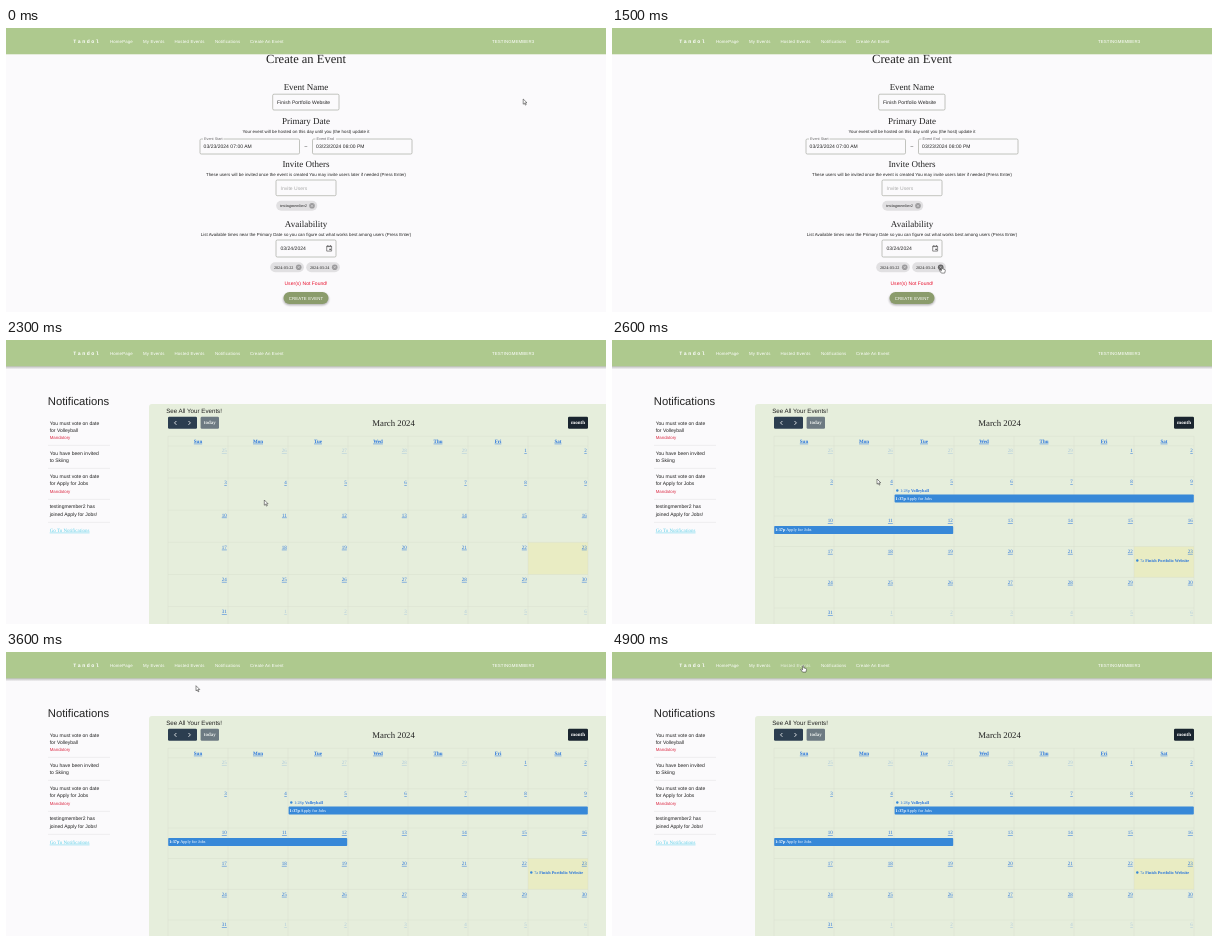
Write an HTML page that moves like this. It is 600x284 px and loops after 5 s.

```html
<!DOCTYPE html>
<html lang="en">
<head>
<meta charset="utf-8">
<title>Event planner</title>
<style>
  html, body { margin: 0; width: 100%; height: 100%; overflow: hidden; background: #fbfafc; }
  svg { display: block; width: 100%; height: 100%; }
  text { font-family: "Liberation Sans", Arial, sans-serif; text-rendering: geometricPrecision; white-space: pre; }
  .serif { font-family: "Liberation Serif", Times, serif; }
  .mono { font-family: "Liberation Mono", Courier, monospace; }
  .bold { font-weight: bold; }
  .link { text-decoration: underline; text-decoration-thickness: .3px; }
  .mid { text-anchor: middle; }
  .end { text-anchor: end; }
  .nav { letter-spacing: .125px; }
  .body { letter-spacing: .03px; }
</style>
</head>
<body>
<svg id="stage" viewBox="0 0 600 284"></svg>
<script>
const INK = '#222', LINK = '#2472dc', EVENT = '#3788d8', GRID = '#d3dbc9';
const $ = id => document.getElementById(id);

const text = (x, y, str, size, cls = '', fill = INK, extra = '') =>
  `<text x="${x}" y="${y}" font-size="${size}" class="${cls}" fill="${fill}" ${extra}>${str}</text>`;
const rect = (x, y, w, h, fill, r = 0, extra = '') =>
  `<rect x="${x}" y="${y}" width="${w}" height="${h}" rx="${r}" fill="${fill}" ${extra}/>`;
const path = (d, stroke, width = .5, fill = 'none') =>
  `<path d="${d}" stroke="${stroke}" stroke-width="${width}" fill="${fill}"/>`;
const field = (x, y, w, h) => rect(x, y, w, h, 'none', 1.25, 'stroke="#92958a" stroke-width=".55"');

function navBar() {
  const items = [[104, 'HomePage'], [137, 'My Events'], [168.5, 'Hosted Events', 'hosted'],
    [209, 'Notifications'], [244, 'Create An Event'], [486, 'TESTINGMEMBER3']];
  return `<g id="navShadow">${rect(0, 26, 600, 3.5, 'url(#shade)')}</g>` + rect(0, 0, 600, 26.3, '#aec98e') +
    text(67.3, 14.6, 'Tandol', 5, 'mono bold', '#fff', 'letter-spacing="1.5"') +
    items.map(([x, str, id = '']) => text(x, 14.5, str, 4.375, 'nav', '#fff', `id="${id}"`)).join('');
}

function chip(x, y, w, label, id = '') {
  const cx = x + w - 5.2, cy = y + 5;
  return rect(x, y, w, 10, '#e1e0e2', 5) + text(x + 3.7, y + 6.3, label, 4.2, 'serif') +
    `<circle id="${id}" cx="${cx}" cy="${cy}" r="2.8" fill="#9c9b9d"/>` +
    path(`M${cx - 1.1} ${cy - 1.1}l2.2 2.2m0-2.2l-2.2 2.2`, '#e6e5e7', .55);
}

function dateField(x, label, value) {
  return field(x, 111, 99.5, 15) + rect(x + 3, 110, 20.5, 2, '#fbfafc') +
    text(x + 4, 112.2, label, 3.75, '', '#666') + text(x + 3.6, 120.1, value, 5, 'body');
}

function formPage() {
  const heading = (y, str, size = 9) => text(300, y, str, size, 'serif mid');
  const note = (y, str) => text(300, y, str, 4.375, 'mid', INK, 'letter-spacing=".02"');
  return heading(35.2, 'Create an Event', 12.5) +
    heading(61.8, 'Event Name') + field(266.7, 66.2, 66.3, 15.8) +
    text(271, 75.8, 'Finish Portfolio Website', 5, 'body') +
    heading(95.8, 'Primary Date') +
    note(105.4, 'Your event will be hosted on this day until you (the host) update it') +
    dateField(194, 'Event Start', '03/23/2024 07:00 AM') + text(300, 120.3, '–', 5, 'mid') +
    dateField(306.5, 'Event End', '03/23/2024 08:00 PM') +
    heading(138.9, 'Invite Others') +
    note(148.4, 'These users will be invited once the event is created You may invite users later if needed (Press Enter)') +
    field(270, 152, 60, 15.7) + text(274.5, 161.5, 'Invite Users', 5, 'body', '#aaa') +
    chip(270.2, 172.8, 41, 'testingmember2') +
    heading(198.8, 'Availability') +
    note(208.3, 'List Available times near the Primary Date so you can figure out what works best among users (Press Enter)') +
    field(270, 212, 60, 17) + text(274.5, 222, '03/24/2024', 5, 'body') +
    path('M320.7 218.2h4.9v4.9h-4.9zM320.7 218.6h4.9M321.8 217v1M324.5 217v1', '#444', .6) +
    rect(323.4, 220.7, 1.4, 1.4, '#444') +
    chip(264.2, 234.2, 33.7, '2024-03-22') + chip(300.2, 234.2, 33.7, '2024-03-24', 'removeDate') +
    text(300, 256.9, 'User(s) Not Found!', 5, 'mid body', '#e8112d') +
    `<g id="buttonShadow">${rect(277.3, 265.3, 45.4, 12, '#000', 6, 'filter="url(#blur)"')}</g>` +
    rect(277.5, 264, 45, 12, '#8b9c6c', 6, 'id="button"') +
    text(300, 271.6, 'CREATE EVENT', 4.375, 'mid nav', '#fff');
}

function notifications() {
  const line = (y, str) => text(43.7, y, str, 5);
  const mandatory = y => text(43.7, y, 'Mandatory', 4.375, '', '#dc2b45');
  return text(41.8, 64.6, 'Notifications', 11.25) +
    line(84.7, 'You must vote on date') + line(91.9, 'for Volleyball') + mandatory(99.1) +
    line(114.9, 'You have been invited') + line(122.1, 'to Skiing') +
    line(138.1, 'You must vote on date') + line(145.3, 'for Apply for Jobs') + mandatory(152.5) +
    line(168.4, 'testingmember2 has') + line(175.6, 'joined Apply for Jobs!') +
    [105.4, 128.4, 159.4, 182.4].map(y => path(`M42 ${y}h62`, '#dcdbdd', .4)).join('') +
    text(43.7, 191.7, 'Go To Notifications', 5, 'serif link', '#5bcfe8');
}

// rowTops: upper edge of each of the six weeks
function calendarGrid(rowTops) {
  let out = rect(522, rowTops[3], 60, rowTops[4] - rowTops[3], '#e9ecc3');
  out += path(`M162 96.3h420M162 96.3v188` + rowTops.map(y => `M162 ${y}h420`).join('') +
    [1, 2, 3, 4, 5, 6, 7].map(c => `M${162 + c * 60} 96.3v188`).join(''), GRID, .4);
  ['Sun', 'Mon', 'Tue', 'Wed', 'Thu', 'Fri', 'Sat'].forEach((day, c) =>
    out += text(192 + c * 60, 102.7, day, 5, 'serif bold link mid', LINK));
  rowTops.forEach((top, row) => {
    for (let c = 0; c < 7; c++) {
      const date = new Date(2024, 1, 25 + row * 7 + c);
      const opacity = date.getMonth() === 2 ? 1 : .3;
      out += text(220.8 + c * 60, top + 6.4, date.getDate(), 5, 'serif link end', LINK, `opacity="${opacity}"`);
    }
  });
  return out;
}

function calendarEvents() {
  const dot = (x, y, time, title) => `<circle cx="${x}" cy="${y}" r="1.2" fill="${EVENT}"/>` +
    text(x + 2.9, y + 1.4, `${time} <tspan class="bold">${title}</tspan>`, 4.25, 'serif', LINK);
  const bar = (x, y, w) => rect(x, y, w, 8, EVENT, .8) +
    text(x + 1, y + 5.4, '<tspan class="bold">1:37p</tspan> Apply for Jobs', 4.25, 'serif', '#fff');
  return dot(285.3, 150.5, '1:28p', 'Volleyball') + bar(282.6, 154.6, 299.2) +
    bar(162.2, 186, 179) + dot(525.3, 220.5, '7a', 'Finish Portfolio Website');
}

function calendarPage() {
  return notifications() + rect(143, 64, 470, 240, '#e6eedc', 3) +
    text(160.2, 73.4, 'See All Your Events!', 6.2) +
    rect(162, 76.8, 29, 12, '#2c3e50', 1.25) +
    path('M170.4 81l-1.9 1.9l1.9 1.9M182.5 81l1.9 1.9l-1.9 1.9', '#fff', .8) +
    rect(194.6, 76.8, 18.4, 12, '#6d7a82', 1.25) + text(203.8, 84.3, 'today', 5, 'serif bold mid', '#e8ecea') +
    text(387.5, 86, 'March 2024', 8.75, 'serif mid') +
    rect(562, 76.8, 20, 12, '#1a252f', 1.25) + text(572, 84.3, 'month', 5, 'serif bold mid', '#fff') +
    `<g id="empty">${calendarGrid([106, 138, 170.2, 202.3, 234.5, 266.6])}</g>` +
    `<g id="filled">${calendarGrid([105.8, 136.8, 176, 206.5, 237.4, 268])}${calendarEvents()}</g>`;
}

$('stage').innerHTML = `<defs>
    <linearGradient id="shade" x2="0" y2="1"><stop stop-opacity=".26"/><stop offset="1" stop-opacity="0"/></linearGradient>
    <filter id="blur" x="-20%" y="-50%" width="140%" height="200%"><feGaussianBlur stdDeviation=".9"/></filter>
  </defs>` + rect(0, 0, 600, 284, '#fbfafc') +
  `<g id="form">${formPage()}</g><g id="calendar">${calendarPage()}</g>` + navBar() +
  `<g id="pointer"><g id="arrow">${path('M0 0v5.2l1.2-1.1l.9 2l.9-.4l-.9-1.9h1.7z', '#222', .5, '#fff')}</g>` +
  `<g id="hand">${path('M-.6 .4q.6-.8 1.2 0v2l2.4 .6q.5.3.3 1.2l-.6 2.4h-3.3l-1.9-2.5q.2-.9 1.1-.3l.8.6z', '#222', .5, '#fff')}</g></g>`;

// Pointer tip: time, x, y
const route = [[1000, 517.2, 71], [1200, 450, 140], [1400, 340, 232], [1500, 330, 238.5], [1600, 329, 240],
  [1700, 317, 262], [1800, 312, 268], [2000, 312, 268], [2100, 376, 242], [2200, 439, 206],
  [2300, 258.3, 160], [2500, 264, 143], [2600, 265, 139], [2900, 265, 139], [3200, 215, 66],
  [3400, 190, 34], [3600, 190, 33.7], [4000, 191.2, 13.5]];

function pointerAt(t) {
  const i = route.findIndex(p => p[0] >= t);
  if (i < 1) return i ? route.at(-1).slice(1) : route[0].slice(1);
  const [t0, x0, y0] = route[i - 1], [t1, x1, y1] = route[i];
  const k = (t - t0) / (t1 - t0);
  return [x0 + (x1 - x0) * k, y0 + (y1 - y0) * k];
}

const show = (id, on) => $(id).style.display = on ? '' : 'none';
const within = (t, from, to) => t >= from && t < to;

function draw(t) {
  const onForm = t < 2300, loaded = t >= 2500;
  const [x, y] = pointerAt(t);
  const overRemove = within(t, 1500, 1700), overButton = within(t, 1700, 2100), overNav = t >= 4000;
  const clickable = overRemove || overButton || overNav;
  show('form', onForm);
  show('calendar', !onForm);
  show('navShadow', !onForm);
  show('empty', !loaded);
  show('filled', loaded);
  show('arrow', !clickable);
  show('hand', clickable);
  $('pointer').setAttribute('transform', `translate(${x} ${y})`);
  $('removeDate').setAttribute('fill', overRemove ? '#666567' : '#9c9b9d');
  $('button').setAttribute('fill', overButton ? '#7d8e5f' : t >= 2100 ? '#93a476' : '#8b9c6c');
  $('buttonShadow').setAttribute('opacity', t >= 1700 ? .55 : .3);
  $('hosted').setAttribute('opacity', t >= 4100 ? .75 : 1);
}

function tick(now) {
  draw(Math.floor(now % 5000 / 100) * 100);
  requestAnimationFrame(tick);
}
draw(0);
requestAnimationFrame(tick);
</script>
</body>
</html>
```
